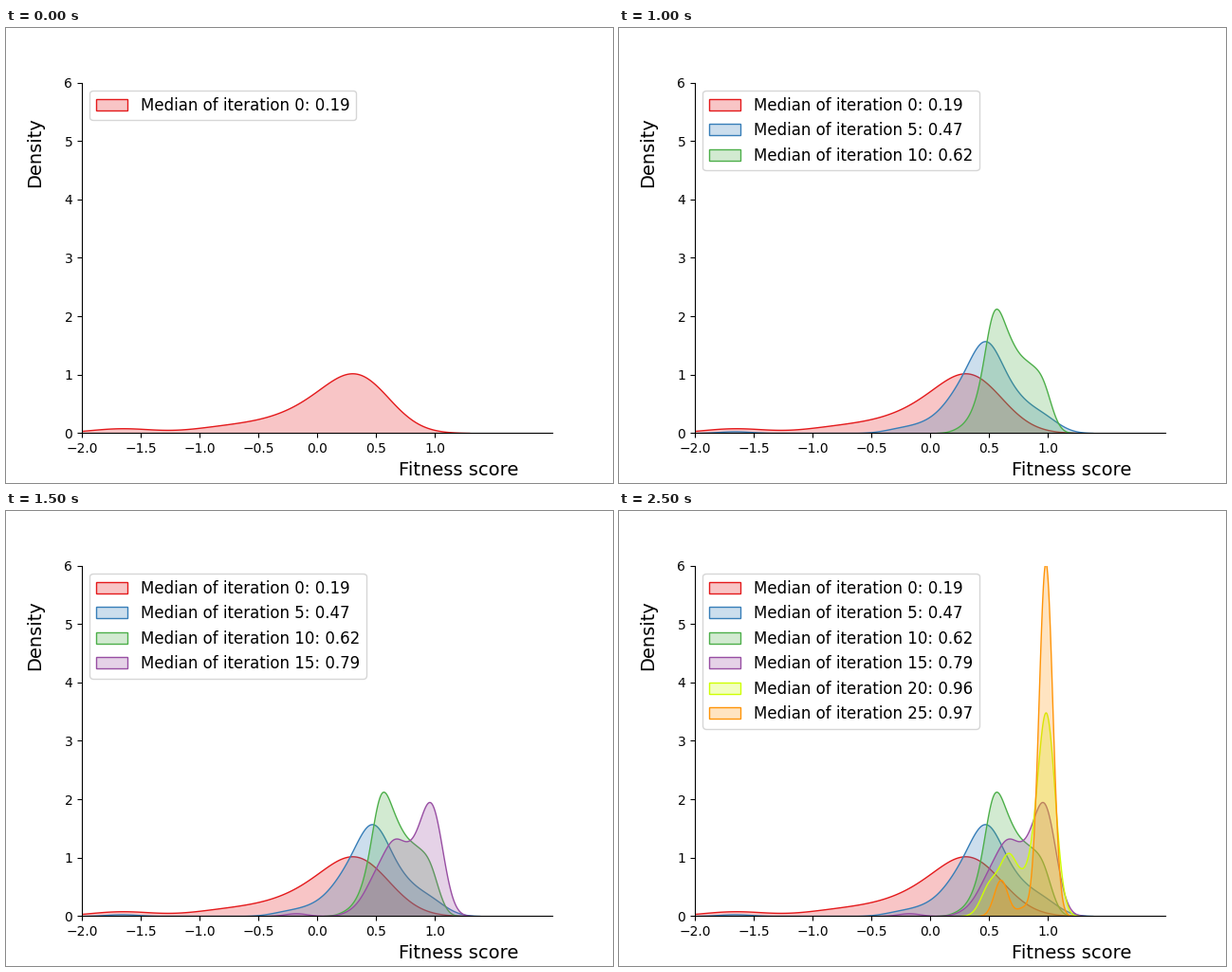
These frames come from a looping animation (640 by 480 pixels, 3 s). A matplotlib script:

```python
import numpy as np
import matplotlib.pyplot as plt
from matplotlib.animation import FuncAnimation

plt.rcParams["font.family"] = "DejaVu Sans"

STEP = 5  # iterations between two curves
COLOURS = [*plt.get_cmap("Set1").colors[:4], "#cfff04", "#ff9408"]

# Median, bandwidth, first and last centre, shares, outlier (centre, share)
POPULATIONS = [
    (0.19, 0.27, -0.85, 0.355, (0.054, 0.085, 0.21, 0.61), (-1.66, 0.054)),
    (0.47, 0.14, -0.25, 0.95, (0.025, 0.047, 0.175, 0.475, 0.157, 0.09),
     (-1.66, 0.01)),
    (0.62, 0.08, 0.27, 0.95, (0.014, 0.066, 0.353, 0.21, 0.165, 0.152), None),
    (0.79, 0.095, 0.33, 0.975, (0.021, 0.124, 0.243, 0.167, 0.417),
     (-0.18, 0.011)),
    (0.96, 0.075, 0.505, 0.985, (0.097, 0.183, 0.098, 0.645), None),
    (0.97, 0.058, 0.6, 0.981, (0.09, 0.02, 0.88), None),
]


def density(x, width, first, last, shares, outlier):
    """Sum of equal-width Gaussians on evenly spaced centres."""
    bumps = list(zip(np.linspace(first, last, len(shares)), shares))
    if outlier:
        bumps.append(outlier)
    total = sum(s * np.exp(-0.5 * ((x - c) / width) ** 2) for c, s in bumps)
    return total / (width * np.sqrt(2 * np.pi))


def add_curve(ax, index, median, *shape):
    x = np.linspace(-2.6, 1.8, 1200)
    y = density(x, *shape)
    keep = y > 0.002
    colour = COLOURS[index]
    return ax.fill_between(
        x[keep], y[keep], facecolor=(colour, 0.25), edgecolor=colour,
        linewidth=1, label=f"Median of iteration {index * STEP}: {median:.2f}")


fig, ax = plt.subplots(figsize=(6.4, 4.8), dpi=100)
curves = [add_curve(ax, i, *p) for i, p in enumerate(POPULATIONS)]

ax.set_xlim(-2, 2)
ax.set_ylim(0, 6)
ax.set_xticks(np.arange(-2, 1.1, 0.5))
ax.set_yticks(range(7))
ax.spines[["top", "right"]].set_visible(False)
ax.set_xlabel("Fitness score", fontsize=14)
ax.set_ylabel("Density", fontsize=14)
ax.xaxis.set_label_coords(0.8, -0.08)
ax.yaxis.set_label_coords(-0.08, 0.8)


def update(step):
    for i, curve in enumerate(curves):
        curve.set_visible(i <= step)
    ax.legend(handles=curves[:step + 1], loc="upper left", fontsize=12,
              labelspacing=0.51)
    return curves


anim = FuncAnimation(fig, update, frames=len(curves), interval=500,
                     repeat=True, repeat_delay=0, blit=False)
plt.show()
```
